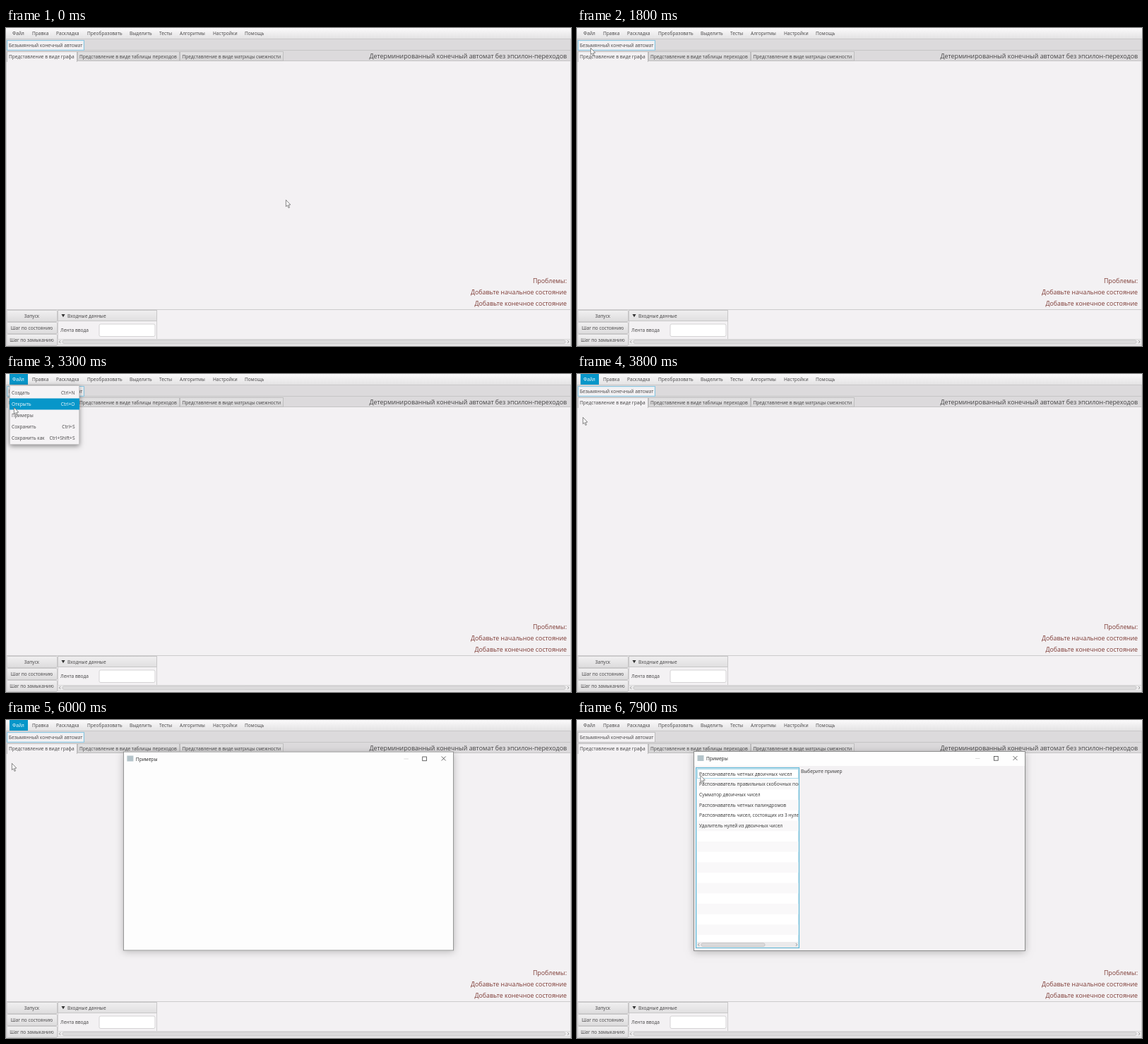
An HTML page with a canvas that plays this animation: 800x450 px, repeating every 8 s.

```html
<!DOCTYPE html>
<html lang="ru">
<head>
<meta charset="utf-8">
<style>
html, body { margin: 0; width: 100%; height: 100%; overflow: hidden; background: #f3f1f3; }
canvas { display: block; }
</style>
</head>
<body>
<canvas id="stage" width="800" height="450"></canvas>
<script>
const c = document.getElementById('stage').getContext('2d');
const SMALL = 6.6, LARGE = 8.83;
const INK = '#444344', EDGE = '#c0bfc0', BLUE = '#0796c9', PAGE = '#f3f1f3';
const LOOP = 8000, HOVER = 2000, OPEN = 2500, CLOSE = 3700, POPUP = 5700, LOADED = 6300;

// Cursor tip: time, x, y
const path = [
  [800, 396, 243], [1100, 268, 194], [1200, 268, 194], [1400, 95, 114], [1500, 95, 114],
  [1800, 19, 28], [2100, 12, 5], [2600, 12, 5], [3300, 11, 47], [3500, 8, 61],
  [6700, 8, 61], [6800, 61.5, 60], [7000, 98, 62], [7100, 98, 62], [7900, 174.5, 78]
];

function cursorAt(t) {
  const i = path.findIndex(k => k[0] >= t);
  if (i < 1) return (i ? path[path.length - 1] : path[0]).slice(1);
  const [t0, x0, y0] = path[i - 1], [t1, x1, y1] = path[i];
  const p = (t - t0) / (t1 - t0);
  return [x0 + (x1 - x0) * p, y0 + (y1 - y0) * p];
}

function fill(x, y, w, h, color) {
  c.fillStyle = color;
  c.fillRect(x, y, w, h);
}

function frame(x, y, w, h, color) {
  c.lineWidth = 1;
  c.strokeStyle = color;
  c.strokeRect(x + .5, y + .5, w - 1, h - 1);
}

function box(x, y, w, h, color, edge) {
  fill(x, y, w, h, color);
  frame(x, y, w, h, edge);
}

function round(x, y, w, h, r, color, edge) {
  c.beginPath();
  c.roundRect(x, y, w, h, r);
  c.fillStyle = color;
  c.fill();
  c.lineWidth = .8;
  c.strokeStyle = edge;
  c.stroke();
}

function shade(y, h, top, bottom) {
  const g = c.createLinearGradient(0, y, 0, y + h);
  g.addColorStop(0, top);
  g.addColorStop(1, bottom);
  return g;
}

function line(color, width, ...pts) {
  c.beginPath();
  pts.forEach(p => c.lineTo(...p));
  c.strokeStyle = color;
  c.lineWidth = width;
  c.stroke();
}

function shadow(alpha, blur, drop, ...rect) {
  c.save();
  c.shadowColor = `rgba(0,0,0,${alpha})`;
  c.shadowBlur = blur;
  c.shadowOffsetY = drop;
  fill(...rect);
  c.restore();
}

// Laid out at ten times the size so that small glyphs keep exact advances
function text(s, x, y, { size = SMALL, color = INK, align = 'left' } = {}) {
  c.save();
  c.translate(x, y);
  c.scale(.1, .1);
  c.font = `${size * 10}px "Open Sans", "Noto Sans", sans-serif`;
  c.textAlign = align;
  c.fillStyle = color;
  c.fillText(s, 0, 0);
  c.restore();
}

function chevron(x, y, dir) {
  line('#8a8a8a', .8, [x - dir, y - 2], [x + dir, y], [x - dir, y + 2]);
}

function drawMenuBar(active) {
  fill(0, 0, 800, 16, shade(0, 16, '#fbfafb', '#e2e1e2'));
  fill(0, 15, 800, 1, '#c9c8c9');
  if (active) fill(5, 0, 26, 15, BLUE);
  const items = { 'Файл': 9, 'Правка': 37, 'Раскладка': 71, 'Преобразовать': 115, 'Выделить': 175,
    'Тесты': 217, 'Алгоритмы': 246, 'Настройки': 293, 'Помощь': 338 };
  for (const s in items) text(s, items[s], 10.4, { color: active && s === 'Файл' ? '#fff' : INK });
}

function drawTabs(focused) {
  fill(0, 16, 800, 31, '#dcdadc');
  fill(0, 31, 800, 1, '#c6c5c6');
  box(1, 17, 110, 15, PAGE, focused ? '#8cc5df' : EDGE);
  if (focused) frame(2, 18, 108, 13, '#deedf4');
  text('Безымянный конечный автомат', 4, 26.8);

  fill(0, 46, 800, 1, '#c6c5c6');
  box(1, 33, 100, 15, PAGE, EDGE);
  fill(2, 46, 98, 2, PAGE);
  const tab = shade(33, 14, '#e4e3e4', '#d5d4d5');
  box(101, 33, 145, 14, tab, EDGE);
  box(246, 33, 147, 14, tab, EDGE);
  text('Представление в виде графа', 4, 42.6);
  text('Представление в виде таблицы переходов', 104, 42.6);
  text('Представление в виде матрицы смежности', 249.5, 42.6);
  text('Детерминированный конечный автомат без эпсилон-переходов', 794, 43.2,
    { size: LARGE, align: 'right' });
}

function drawBottom() {
  ['Проблемы:', 'Добавьте начальное состояние', 'Добавьте конечное состояние'].forEach((s, i) =>
    text(s, 794, 361.4 + 16 * i, { size: LARGE, color: '#7d3a34', align: 'right' }));

  fill(0, 398, 800, 1, '#cccbcc');
  ['Запуск', 'Шаг по состоянию', 'Шаг по замыканию'].forEach((s, i) => {
    const y = 399 + 17 * i;
    round(.9, y + .5, 71.6, 16, 1.5, shade(y, 16, '#f2f1f2', '#dddcdd'), EDGE);
    text(s, 36.5, y + 10.5, { align: 'center' });
  });

  box(73, 399, 141, 42, PAGE, '#cfcecf');
  box(73, 399, 141, 16, shade(399, 16, '#f0eff0', '#e0dfe0'), '#c8c7c8');
  c.beginPath();
  c.moveTo(78.5, 405);
  c.lineTo(83.5, 405);
  c.lineTo(81, 409.3);
  c.fillStyle = '#333';
  c.fill();
  text('Входные данные', 87, 409.5);
  text('Лента ввода', 77, 430.3);
  round(132, 419, 79, 17.5, 2, '#fff', '#cccbcc');

  box(73, 440, 727, 9, '#ecebec', '#d8d7d8');
  round(80, 441.8, 712, 4.6, 2, '#dddcdd', '#c0bfc0');
  chevron(76.3, 444, -1);
  chevron(796, 444, 1);
  fill(0, 16, 1, 434, '#cccbcc');
  fill(799, 16, 1, 434, '#cccbcc');
}

function drawDropdown(y) {
  shadow(.45, 7, 2, 5, 16, 99, 84, '#f5f3f5');
  frame(5, 16, 99, 84, '#cbcacb');
  const hot = Math.floor((y - 19) / 16);
  [['Создать', 'Ctrl+N'], ['Открыть', 'Ctrl+O'], ['Примеры', ''], ['Сохранить', 'Ctrl+S'],
    ['Сохранить как', 'Ctrl+Shift+S']].forEach(([s, keys], i) => {
    const color = i === hot ? '#fff' : INK, base = 29 + 16 * i;
    if (i === hot) fill(5, 18.5 + 16 * i, 99, 16, BLUE);
    text(s, 8, base, { color });
    text(keys, 97.5, base, { color, align: 'right' });
  });
}

function drawList() {
  fill(166, 65, 468, 261, PAGE);
  box(168, 67, 147, 256, '#fff', '#5db7d7');
  frame(169, 68, 145, 254, '#cfe7f0');
  c.save();
  c.beginPath();
  c.rect(170, 69, 143.5, 245);
  c.clip();
  const names = ['Распознаватель четных двоичных чисел',
    'Распознаватель правильных скобочных последовательностей', 'Сумматор двоичных чисел',
    'Распознаватель четных палиндромов', 'Распознаватель чисел, состоящих из 3 нулей',
    'Удалитель нулей из двоичных чисел'];
  for (let i = 0; i < 17; i++) {
    const y = 69 + 14.7 * i;
    if (i % 2) fill(170, y, 144, 14.7, '#f9f8f9');
    if (names[i]) text(names[i], 173, y + 9.5, { color: '#333' });
  }
  frame(170, 69, 144, 14, '#a9d8e8');
  c.restore();
  fill(170, 314, 143, 8, '#ebeaeb');
  round(176, 315.8, 90, 4.6, 2, '#dcdbdc', '#bfbebf');
  chevron(172.3, 318, -1);
  chevron(310.8, 318, 1);
  text('Выберите пример', 317, 75.4, { color: '#333' });
}

function drawWindow(t) {
  const p = Math.min(1, (t - POPUP + 50) / 530), rest = (1 - p) ** 3, zoom = 1 - .1 * rest;
  c.save();
  c.globalAlpha = 1 - rest / 3;
  c.translate(400, 185.5);
  c.scale(zoom, zoom);
  c.translate(-400, -185.5);
  shadow(.25, 10, 2, 165, 44, 470, 283, '#fefefe');
  if (t >= LOADED) drawList();
  frame(165, 44, 470, 283, '#8d8d8d');
  fill(170.5, 50, 9, 8, '#b4c4ca');
  text('Примеры', 183, 57.3, { color: '#222' });
  line('#d4d4d4', .8, [564, 54.5], [570.5, 54.5]);
  c.lineWidth = .8;
  c.strokeStyle = '#444';
  c.strokeRect(590.5, 51.5, 5.7, 5.7);
  line('#444', .8, [617.5, 51], [623.5, 57]);
  line('#444', .8, [623.5, 51], [617.5, 57]);
  c.restore();
}

function drawCursor(x, y) {
  c.save();
  c.translate(x + .4, y + .3);
  c.beginPath();
  [[0, 0], [0, 9.4], [2.1, 7.5], [3.6, 11.2], [5.1, 10.6], [3.6, 7], [6.4, 6.8]]
    .forEach(p => c.lineTo(...p));
  c.closePath();
  c.fillStyle = '#fff';
  c.fill();
  c.lineWidth = .8;
  c.strokeStyle = '#6a6a6a';
  c.stroke();
  c.restore();
}

function draw(now) {
  const t = Math.floor(now % LOOP / 100) * 100;
  const [x, y] = cursorAt(t);
  fill(0, 0, 800, 450, PAGE);
  drawMenuBar(t >= HOVER && t < LOADED);
  drawTabs(t < LOADED);
  drawBottom();
  if (t >= OPEN && t < CLOSE) drawDropdown(y);
  if (t >= POPUP) drawWindow(t);
  drawCursor(x, y);
}

const start = performance.now();
function tick() {
  draw(performance.now() - start);
  requestAnimationFrame(tick);
}
tick();
</script>
</body>
</html>
```
